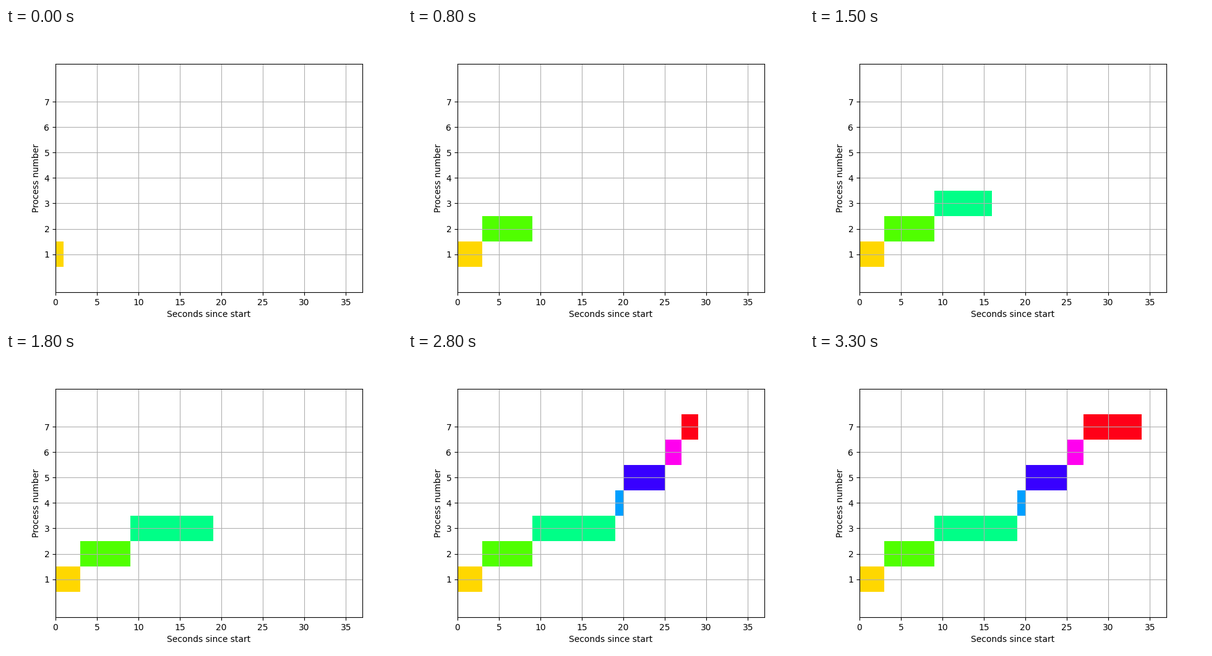
Write a matplotlib script that moves like this. It is 640 px wide and 480 px high and loops after 3400 ms.

```python
import matplotlib.pyplot as plt
import numpy as np
from matplotlib.animation import FuncAnimation

durations = np.array([3, 6, 10, 1, 5, 2, 7])
starts = np.cumsum(durations) - durations
numbers = np.arange(1, len(durations) + 1)
total = int(durations.sum())
colors = plt.get_cmap("hsv", len(durations) + 1)(numbers)

plt.rcParams["font.family"] = "DejaVu Sans"
fig, ax = plt.subplots(figsize=(6.4, 4.8), dpi=100)
bars = ax.barh(numbers, np.zeros(len(numbers)), height=1, left=starts,
               color=colors, linewidth=0)

ax.set_xlim(0, total + 3)
ax.set_ylim(-0.5, 8.5)
ax.set_xticks(range(0, total + 3, 5))
ax.set_yticks(numbers)
ax.set_xlabel("Seconds since start")
ax.set_ylabel("Process number")
ax.grid(True)


def update(frame):
    """Show the schedule after frame + 1 elapsed seconds."""
    widths = np.clip(frame + 1 - starts, 0, durations)
    for bar, width in zip(bars, widths):
        bar.set_width(width)
        bar.set_visible(width > 0)
    return bars.patches


anim = FuncAnimation(fig, update, frames=total, interval=100,
                     repeat=True, repeat_delay=0)
plt.show()
```
